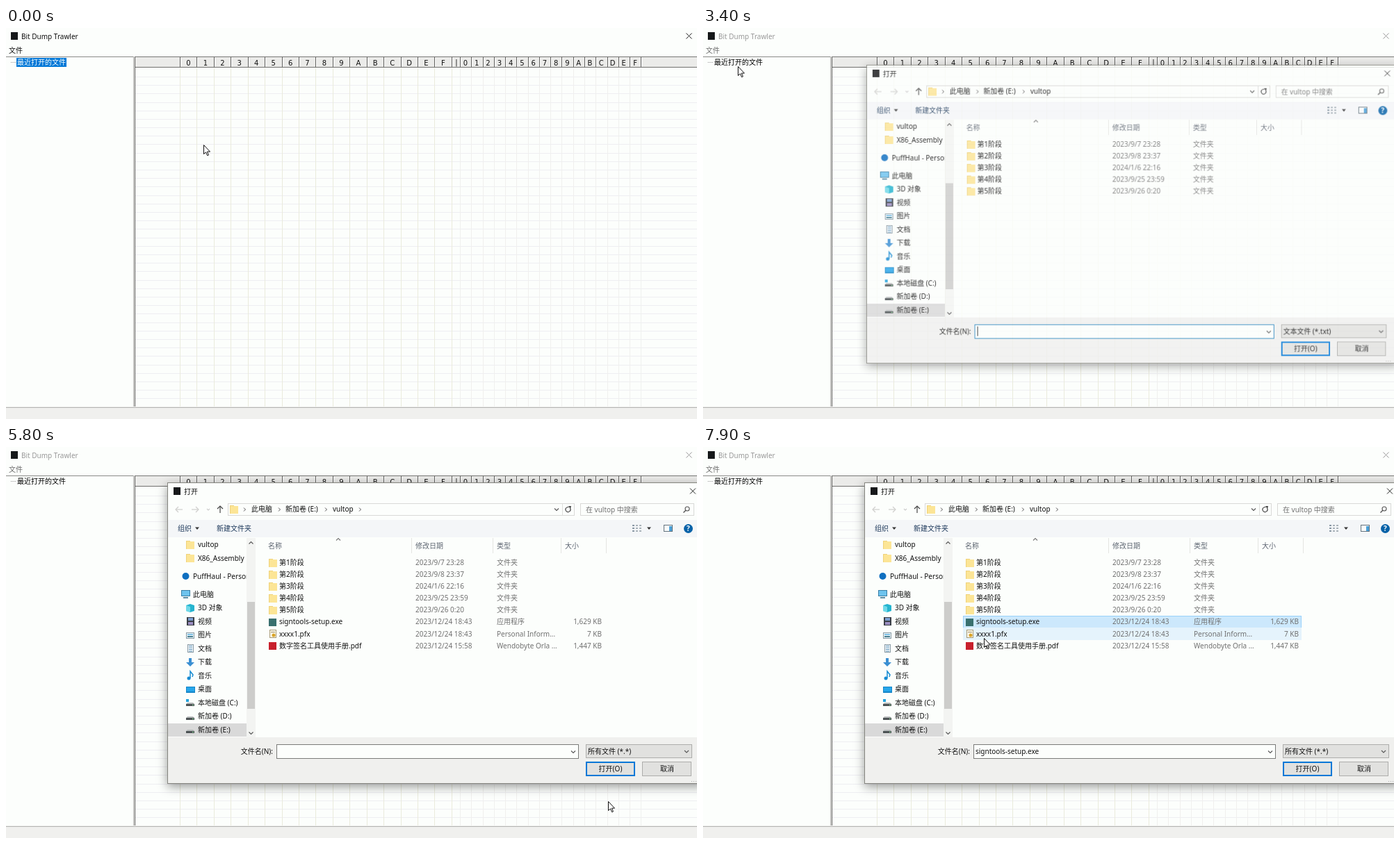
Write an HTML page with a canvas that moves like this. It is 994x563 px and loops after 8 s.

```html
<!DOCTYPE html>
<html lang="zh-CN">
<head>
<meta charset="utf-8">
<style>
html, body { margin: 0; width: 994px; height: 563px; overflow: hidden; background: #fcfefc }
canvas { display: block }
</style>
</head>
<body>
<canvas id="stage" width="994" height="563"></canvas>
<script>
const screen2d = document.getElementById('stage').getContext('2d');
const layer = document.createElement('canvas');
layer.width = 1060; layer.height = 563;
const layer2d = layer.getContext('2d');
let g = screen2d;

const PAPER = '#fcfefc', FACE = '#f0f0ee', BLUE = '#0078d7', INK = '#111', GRAY = '#707070';
const UI = '10px "Noto Sans","Noto Sans CJK SC","Noto Sans CJK",sans-serif';
const HEX = '10px "DejaVu Sans",sans-serif';
const LOOP = 8000, OPEN = 3250, DROP = 4700, PICK = 5800, SELECT = 7400;

const path = [
  [0, 284, 168], [500, 284, 168], [1400, 3, 33], [1900, 3, 33], [2500, 50, 55],
  [3700, 50, 55], [4100, 763, 426], [4500, 905, 438], [4900, 905, 438], [5200, 871, 458],
  [5650, 866, 510], [5900, 866, 510], [6600, 673, 385], [7200, 425, 250], [7600, 425, 250], [7900, 404, 275]
];
const types = ['文本文件 (*.txt)', '可执行文件 (*.exe)', 'DLL文件 (*.dll)', 'SYS文件 (*.sys)', '所有文件 (*.*)'];
const folders = ['2023/9/7 23:28', '2023/9/8 23:37', '2024/1/6 22:16', '2023/9/25 23:59', '2023/9/26 0:20']
  .map((date, i) => [`第${i + 1}阶段`, date, '文件夹', '', folder]);
const files = [
  ['signtools-setup.exe', '2023/12/24 18:43', '应用程序', '1,629 KB', (x, y) => rect(x, y - 5, 11, 11, '#39706f')],
  ['xxxx1.pfx', '2023/12/24 18:43', 'Personal Inform...', '7 KB', certificate],
  ['数字签名工具使用手册.pdf', '2023/12/24 15:58', 'Wendobyte Orla ...', '1,447 KB', (x, y) => rect(x, y - 5, 11, 11, '#c8202c')]
];
const places = [
  ['3D 对象', (x, y) => { poly([x, y - 4, x + 6, y - 6, x + 12, y - 4, x + 12, y + 4, x + 6, y + 6, x, y + 4], '#25b4cf'); poly([x, y - 4, x + 6, y - 2, x + 6, y + 6, x, y + 4], '#70d9e8'); }],
  ['视频', (x, y) => { rect(x + 1, y - 6, 11, 12, '#3a3f46'); rect(x + 3, y - 5, 7, 4, '#7b9fd0'); rect(x + 3, y + 1, 7, 4, '#9a8cc0'); }],
  ['图片', (x, y) => { box(x, y - 4, 12, 9, '#edf5f8', '#8799a3'); rect(x + 2, y - 2, 8, 2, '#7fc1e6'); rect(x + 2, y + 1, 8, 2, '#477f91'); }],
  ['文档', (x, y) => { box(x + 2, y - 6, 9, 12, '#f4f8fa', '#8799a3'); for (let i = 0; i < 4; i++) rect(x + 4, y - 4 + i * 2.5, 5, 1, '#6297bd'); }],
  ['下载', (x, y) => poly([x + 4, y - 6, x + 8, y - 6, x + 8, y, x + 12, y, x + 6, y + 6, x, y, x + 4, y], '#3a8fd2')],
  ['音乐', (x, y) => { disc(x + 4, y + 4, 2.5, '#168bd2'); line([x + 6, y + 4, x + 6, y - 6, x + 10, y - 1, x + 9, y + 2], '#168bd2', 1.5); }],
  ['桌面', (x, y) => { rect(x, y - 4, 13, 9, '#1686c8'); rect(x + 1, y - 3, 11, 6, '#27a6ea'); }],
  ['本地磁盘 (C:)', (x, y) => { drive(x, y); rect(x, y - 5, 4, 4, '#25a3dc'); }],
  ['新加卷 (D:)', drive],
  ['新加卷 (E:)', drive]
];

function rect(x, y, w, h, color) { g.fillStyle = color; g.fillRect(x, y, w, h); }
function box(x, y, w, h, fill, edge, width = 1) {
  rect(x, y, w, h, edge);
  rect(x + width, y + width, w - 2 * width, h - 2 * width, fill);
}
function text(s, x, y, color = INK, align = 'left', font = UI) {
  g.font = font; g.fillStyle = color; g.textAlign = align;
  g.fillText(s, x, y + 3.6);
}
function trace(p) {
  g.beginPath();
  for (let i = 0; i < p.length; i += 2) g.lineTo(p[i], p[i + 1]);
}
function line(p, color, width = 1) { trace(p); g.strokeStyle = color; g.lineWidth = width; g.stroke(); }
function poly(p, color) { trace(p); g.fillStyle = color; g.fill(); }
function disc(x, y, r, color) { g.beginPath(); g.arc(x, y, r, 0, 7); g.fillStyle = color; g.fill(); }
function cross(x, y, color) {
  line([x - 4, y - 4, x + 4, y + 4], color);
  line([x + 4, y - 4, x - 4, y + 4], color);
}
function chevron(x, y, dir, color = '#555', r = 3) {
  if (dir === 'right') line([x - 1, y - 2.5, x + 1.5, y, x - 1, y + 2.5], color);
  else { const d = dir === 'up' ? -1 : 1; line([x - r, y - d * r / 2, x, y + d * r / 2, x + r, y - d * r / 2], color, 1.1); }
}
function caret(x, y, color = '#333') { poly([x - 3, y - 1.5, x + 3, y - 1.5, x, y + 2], color); }
function arrow(x, y, dx, dy, color) {
  line([x - dx * 5, y - dy * 5, x + dx * 5, y + dy * 5], color, 1.2);
  line([x + dx - dy * 4, y + dy - dx * 4, x + dx * 5, y + dy * 5, x + dx + dy * 4, y + dy + dx * 4], color, 1.2);
}
function folder(x, y) {
  rect(x, y - 6, 6, 12, '#efd27a');
  rect(x + 1, y - 5, 11, 11, '#fce596');
}
function drive(x, y) {
  poly([x + 2, y, x + 10, y, x + 12, y + 2, x, y + 2], '#b8bcbc');
  rect(x, y + 2, 12, 3, '#4c5254');
  rect(x + 9, y + 3, 2, 1, '#8ee29b');
}
function certificate(x, y) {
  box(x + 1, y - 6, 10, 12, '#fbf7e8', '#a79a78');
  rect(x + 3, y - 3, 6, 1, '#9a8b6a');
  disc(x + 7, y + 2, 2.5, '#d9a429');
}
const appIcon = (x, y) => rect(x, y, 10, 11, '#16181a');

function pointer(t) {
  let i = 1;
  while (i < path.length - 1 && path[i][0] < t) i++;
  const [t0, x0, y0] = path[i - 1], [t1, x1, y1] = path[i];
  const p = Math.min(1, (t - t0) / (t1 - t0)), e = p * p * (3 - 2 * p);
  return [x0 + (x1 - x0) * e, y0 + (y1 - y0) * e];
}

function drawWindow(t) {
  const active = t < OPEN;
  rect(0, 0, 994, 563, PAPER);
  appIcon(7, 6);
  text('Bit Dump Trawler', 22, 12, active ? INK : '#999');
  cross(982.5, 11.5, active ? '#222' : '#999');
  if (t > 1350 && t < 3150) box(0, 25, 29, 16, t < 1900 ? '#e5f3fc' : '#cce8fc', t < 1900 ? '#d5eafa' : '#99d1fa');
  text('文件', 4, 32.5, active ? INK : '#6d6d6d');
  rect(0, 41, 184, 1, '#8a8a88');
  rect(183, 41, 1, 504, '#b0b0ae');
  rect(184, 41, 1, 504, FACE);
  rect(185, 41, 1, 504, '#5c5c5a');
  rect(185, 41, 809, 1, '#777775');
  for (let x = 7; x < 15; x += 2) rect(x, 49, 1, 1, '#999');
  if (active) rect(15, 43, 72, 13, BLUE);
  text('最近打开的文件', 16, 49.5, active ? '#fff' : '#000');

  for (let y = 70.4; y < 544; y += 12.2) rect(186, Math.floor(y), 808, 1, '#eeeef2');
  rect(186, 42, 808, 14, '#ebebe9');
  rect(186, 56, 808, 1, '#70706e');
  const column = (x, color) => {
    x = Math.round(x);
    rect(x, 57, 1, 488, color);
    rect(x, 42, 1, 14, '#5f5f5d');
    rect(x + 1, 43, 1, 13, '#fff');
  };
  for (let i = 0; i <= 16; i++) {
    column(250 + i * 24.43, '#eaebdc');
    column(653 + i * 16.27, '#f0f0ee');
    if (i === 16) break;
    const digit = i.toString(16).toUpperCase();
    text(digit, 262.5 + i * 24.43, 49.9, INK, 'center', HEX);
    text(digit, 661 + i * 16.27, 49.9, INK, 'center', HEX);
  }
  text('|', 648, 49.5, INK, 'center', HEX);
  rect(0, 545, 994, 18, FACE);
  rect(0, 546, 994, 1, '#b4b4b2');
}

function drawMenu(y) {
  box(0, 41, 118, 42, '#f2f2f2', '#bdbdbd');
  if (y > 43) rect(3, 44, 112, 18, '#91c9f7');
  text('打开', 28, 53);
  text('退出', 28, 72);
}

function drawNav() {
  g.save();
  g.beginPath(); g.rect(233, 131, 113, 287); g.clip();
  ['vultop', 'X86_Assembly'].forEach((s, i) => {
    folder(259, 141 + i * 19);
    text(s, 276, 140.5 + i * 19.5);
  });
  disc(258.5, 186, 5, '#0f6fc0');
  text('PuffHaul - Personal', 269, 186);
  box(252, 206, 13, 9, '#6ec3ee', '#3a7fa5');
  rect(255, 216, 7, 2, '#5c8ca4');
  text('此电脑', 269, 212);
  rect(233, 398, 113, 19, '#d9d9d9');
  places.forEach(([name, icon], i) => {
    const y = 231.7 + i * 19.5;
    icon(259, Math.round(y));
    text(name, 276, y);
  });
  g.restore();
  rect(346, 131, 13, 287, '#f3f4f2');
  rect(347, 223, 11, 154, '#cdcdcb');
  chevron(352.5, 138, 'up');
  chevron(352.5, 412, 'down');
}

function drawFiles(t, cx, cy, open) {
  text('名称', 377, 142, '#5c6470');
  text('修改日期', 589, 142, '#5c6470');
  text('类型', 706, 142, '#5c6470');
  text('大小', 804, 142, '#5c6470');
  for (const x of [583, 700, 798, 863]) rect(x, 131, 1, 22, '#e4e5e2');
  chevron(478, 133, 'up', '#777');
  const rows = t < PICK ? folders : folders.concat(files);
  const hover = !open && cx > 375 && cx < 860 ? Math.floor((cy - 158) / 17.07) : -1;
  rows.forEach(([name, date, type, size, icon], i) => {
    const y = 166.5 + i * 17.07, top = Math.round(y - 8.7);
    if (t >= SELECT && i === 5) box(374, top, 487, 18, '#cce8fc', '#99d1fa');
    else if (i === hover) rect(374, top, 487, 18, '#e5f3fc');
    icon(378, Math.round(y));
    text(name, 393, y);
    text(date, 589, y, GRAY);
    text(type, 706, y, GRAY);
    text(size, 857, y, GRAY, 'right');
  });
}

function drawDialog(t, cx, cy) {
  const open = t >= DROP && t < PICK;
  g.shadowColor = 'rgba(0,0,0,.4)'; g.shadowBlur = 14; g.shadowOffsetY = 4;
  rect(232, 51, 772, 434, '#85857f');
  g.shadowColor = 'transparent';
  rect(233, 52, 770, 432, PAPER);
  appIcon(241, 58);
  text('打开', 256, 64);
  cross(988, 63.5, '#222');

  arrow(249, 90, -1, 0, '#cfcfcd');
  arrow(272, 90, 1, 0, '#cfcfcd');
  chevron(291, 90, 'down', '#ccc', 2);
  arrow(308, 90, 0, -1, '#444');
  box(319, 81, 499, 18, PAPER, '#d9d9d7');
  folder(322, 90);
  for (const x of [343, 393, 460]) chevron(x, 90, 'right');
  if (t > 3500) chevron(509, 90, 'right');
  text('此电脑', 353, 89.5);
  text('新加卷 (E:)', 402, 89.5);
  text('vultop', 470, 89.5);
  chevron(792, 90, 'down');
  rect(800, 82, 1, 16, '#dededc');
  g.beginPath(); g.arc(808.5, 90, 3.5, -.6, 5); g.strokeStyle = '#444'; g.lineWidth = 1.1; g.stroke();
  poly([809, 85, 813, 85, 812, 89], '#444');
  box(826, 81, 164, 18, PAPER, '#d9d9d7');
  text('在 vultop 中搜索', 834, 90, GRAY);
  g.beginPath(); g.arc(980, 89, 3, 0, 7); g.strokeStyle = '#555'; g.stroke();
  line([978, 91, 974.5, 94.5], '#555', 1.4);

  rect(233, 105, 770, 25, '#f4f6f8');
  text('组织', 247, 117.5, '#1e395b');
  caret(275, 117);
  text('新建文件夹', 303, 117.5, '#1e395b');
  for (let i = 0; i < 3; i++) {
    rect(901, 112 + i * 4, 3, 2, '#8a98a5');
    rect(906, 112 + i * 4, 3, 2, '#aab3ba');
    rect(911, 112 + i * 4, 3, 2, '#aab3ba');
  }
  caret(925, 117);
  box(946, 112, 13, 10, '#f8fbfc', '#64737e');
  rect(954, 114, 4, 7, '#4aa0d8');
  disc(981.5, 117.5, 6.5, '#0762a8');
  text('?', 981.5, 117.5, '#fff', 'center', 'bold ' + UI);

  drawNav();
  drawFiles(t, cx, cy, open);

  rect(233, 418, 770, 66, FACE);
  text('文件名(N):', 384, 438, INK, 'right');
  box(389, 428, 435, 21, PAPER, t < DROP ? '#2583bd' : '#7a7a78');
  if (t >= SELECT) text('signtools-setup.exe', 392, 438.5);
  if (t < 3900) rect(393, 431, 1, 14, '#222');
  chevron(816, 439, 'down');
  box(834, 428, 153, 20, open ? '#cce4f5' : '#e1e1df', open ? '#286f9f' : '#adadab');
  text(types[t < PICK ? 0 : 4], 837, 438);
  chevron(979, 438.5, 'down');
  box(834, 453, 71, 21, '#e1e1df', BLUE, 2);
  text('打开(O)', 869.5, 463.5, INK, 'center');
  box(915, 453, 71, 21, '#e1e1df', '#adadab');
  text('取消', 951, 463.5, INK, 'center');
  for (let i = 0; i < 3; i++) rect(992 - i * 3, 481, 1, 1, '#aaa');

  if (open) {
    rect(837, 451, 152, 70, 'rgba(0,0,0,.3)');
    box(834, 448, 153, 71, PAPER, '#1b699f');
    const over = Math.max(0, Math.min(4, Math.floor((cy - 449) / 13.8)));
    types.forEach((s, i) => {
      if (i === over) rect(835, Math.round(449 + i * 13.8), 151, 14, BLUE);
      text(s, 836, 456.2 + i * 13.85, i === over ? '#fff' : INK);
    });
  }
}

// The dialog fades and grows in as one flat picture.
function showDialog(t, cx, cy) {
  const e = 1 - (1 - Math.min(1, (t - OPEN) / 250)) ** 3, s = 1 - .14 * (1 - e);
  g = layer2d;
  g.clearRect(0, 0, layer.width, layer.height);
  drawDialog(t, cx, cy);
  g = screen2d;
  g.save();
  g.globalAlpha = e ** 3;
  g.translate(567, 274); g.scale(s, s); g.translate(-567, -274);
  g.drawImage(layer, 0, 0);
  g.restore();
}

function drawPointer(x, y) {
  g.save();
  g.translate(Math.round(x) + .5, Math.round(y) + .5);
  const shape = [0, 0, 0, 13, 3, 10.3, 5.2, 15.2, 7, 14.4, 4.9, 9.6, 9, 9.6, 0, 0];
  poly(shape, '#fff');
  line(shape, '#111');
  g.restore();
}

function frame(now) {
  const t = now % LOOP, [x, y] = pointer(t);
  drawWindow(t);
  if (t >= 1900 && t < 3150) drawMenu(y);
  if (t > OPEN) showDialog(t, x, y);
  drawPointer(x, y);
  requestAnimationFrame(frame);
}
requestAnimationFrame(frame);
</script>
</body>
</html>
```
